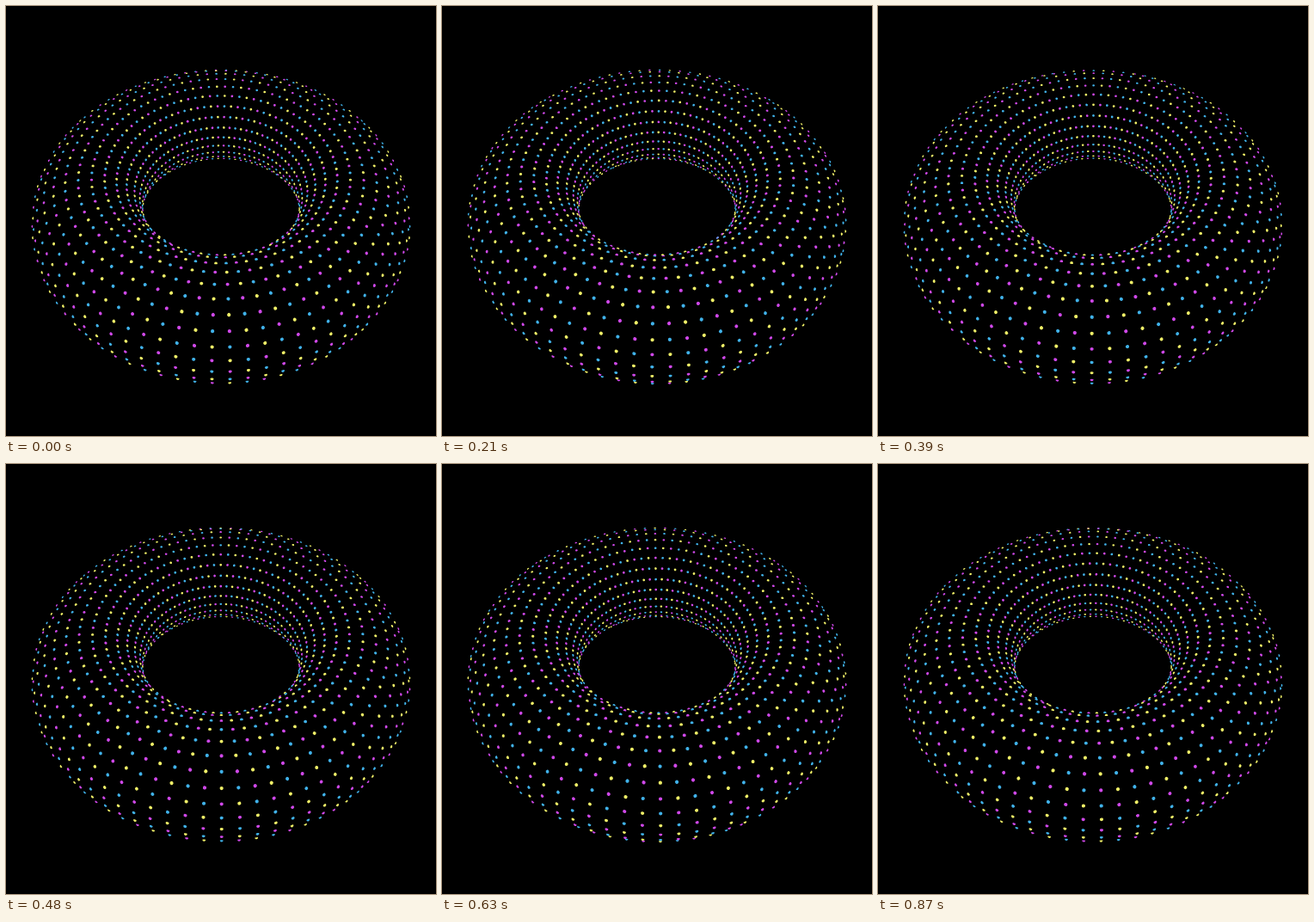
Write an HTML page with a canvas that moves like this. It is 500 px wide and 500 px high and loops after 0.9 s.

```html
<!DOCTYPE html>
<html>
<head>
<meta charset="utf-8">
<style>
  html, body { margin: 0; width: 100%; height: 100%; overflow: hidden; background: #000; }
  canvas { display: block; }
</style>
</head>
<body>
<canvas id="stage" width="500" height="500"></canvas>
<script>
const ctx = document.getElementById('stage').getContext('2d');
const TAU = Math.PI * 2;
const LOOP = 900, STEP = 30;
const COLUMNS = 84, ROWS = 28, FIRST_ROW = -4;
const COLORS = ['#f0f068', '#40b2ea', '#d048ea'];

// Lengths are in units of the tube radius.
const RING = 2.57, DOT = 0.0255, FOCAL = 500;
const camera = { height: 6.476, back: 5.63, tilt: 52.1 * Math.PI / 180 };
const sinT = Math.sin(camera.tilt), cosT = Math.cos(camera.tilt);

// Screen position of a point on a ring of the given radius and height.
function project(theta, radius, height) {
  const side = radius * Math.sin(theta);
  const forward = camera.back - radius * Math.cos(theta);
  const down = camera.height - height;
  const scale = FOCAL / (forward * cosT + down * sinT);
  return {
    x: 250 + side * scale,
    y: 250 + (down * cosT - forward * sinT) * scale,
    scale, side, forward, down
  };
}

// A small bead half sunk into the tube: a half disc outwards, a flattened half inwards.
function drawDot(theta, phi, color) {
  const out = Math.cos(phi), up = Math.sin(phi);
  const p = project(theta, RING + out, up);
  const toward = out * (p.forward * Math.cos(theta) - p.side * Math.sin(theta)) + up * p.down;
  const facing = toward / Math.hypot(p.side, p.forward, p.down);
  if (facing < -0.08) return;

  const tip = project(theta, RING + out * 1.01, up * 1.01);
  const angle = Math.atan2(tip.y - p.y, tip.x - p.x);
  const r = DOT * p.scale;
  ctx.fillStyle = color;
  ctx.beginPath();
  ctx.arc(p.x, p.y, r, angle - TAU / 4, angle + TAU / 4);
  ctx.ellipse(p.x, p.y, r * Math.max(facing, 0), r, angle, TAU / 4, TAU * 3 / 4);
  ctx.fill();
}

function draw(progress) {
  ctx.fillStyle = '#000';
  ctx.fillRect(0, 0, 500, 500);
  for (let i = 0; i < COLUMNS; i++) {
    const theta = (i + 0.5 + progress) / COLUMNS * TAU;
    // The first row starts on the hidden underside.
    for (let j = FIRST_ROW; j < FIRST_ROW + ROWS; j++) {
      const phi = (j + 0.17 + 2 * progress) / ROWS * TAU;
      drawDot(theta, phi, COLORS[(i + j + 7) % 3]);
    }
  }
}

function tick() {
  const time = performance.now() % LOOP;
  draw(Math.floor(time / STEP) * STEP / LOOP);
  requestAnimationFrame(tick);
}
tick();
</script>
</body>
</html>
```
